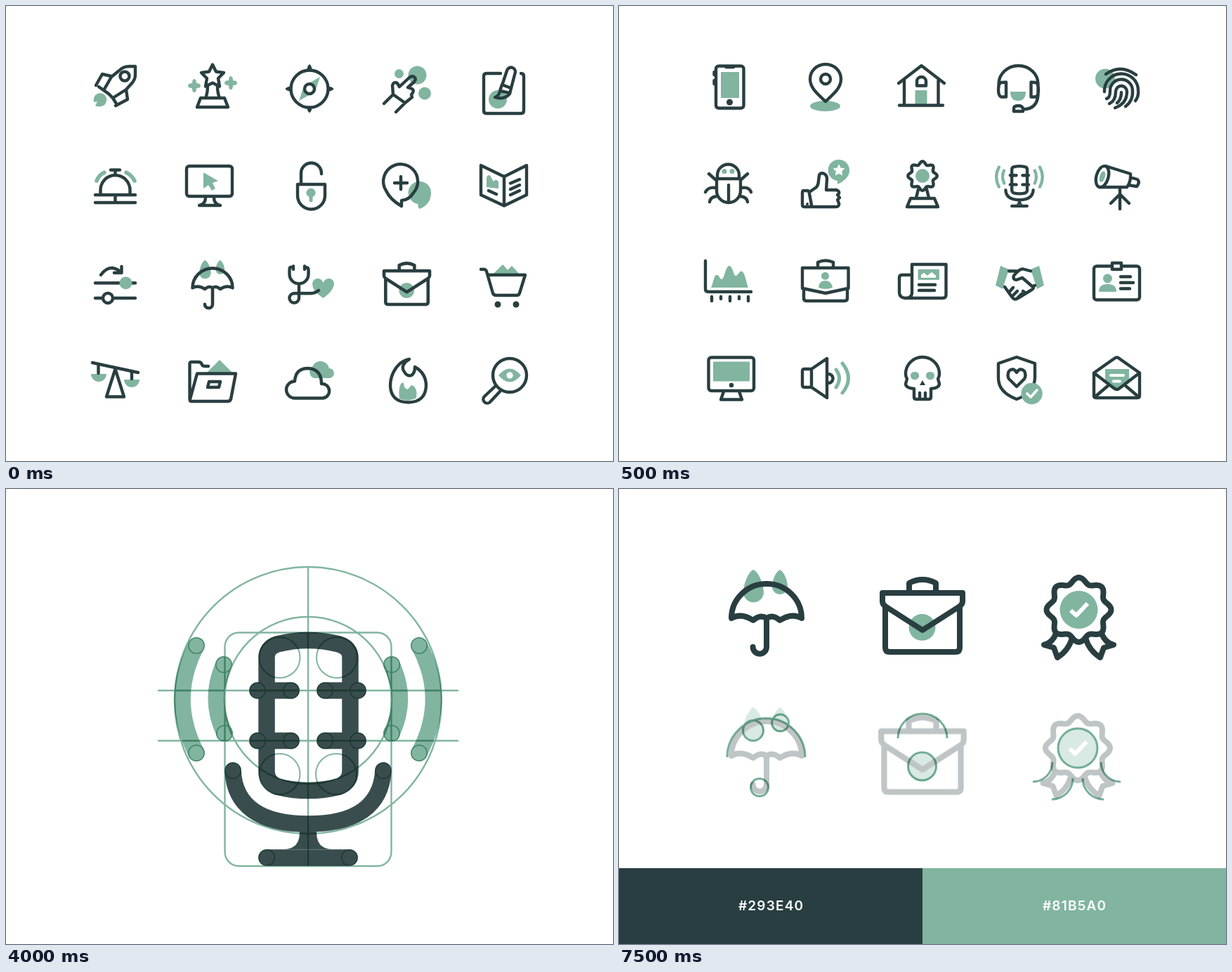
An HTML page that plays this animation: 864 by 648 pixels, repeating every 8 s.

```html
<!DOCTYPE html>
<html lang="en">
<head>
<meta charset="utf-8">
<title>Icon set</title>
<style>
html, body { margin: 0; width: 100%; height: 100%; overflow: hidden; background: #fff; }
svg { display: block; width: 100vw; height: 100vh; background: #fff; fill: none; stroke: #293e40;
  stroke-width: 4.4; stroke-linecap: round; stroke-linejoin: round; }
.g { fill: #81b5a0; stroke: none; }
.k { fill: #293e40; stroke: none; }
.w { fill: #fff; stroke: none; }
.l { stroke: #81b5a0; }
.c { stroke: #fff; }
.large { stroke-width: 8; }
.guide { stroke: #81b5a0; stroke-width: 2.4; mix-blend-mode: multiply; }
.guide.bold { stroke: #74af98; stroke-width: 3; stroke-linecap: butt; }
.faded { opacity: .3; }
text { fill: #fff; stroke: none; font: 600 19px Inter, sans-serif; letter-spacing: 1.2px; text-anchor: middle; }
</style>
</head>
<body>
<svg viewBox="0 0 864 648">
<defs>
  <g id="umbrella" class="large">
    <path class="g" d="M191 115C199 118 206 136 206 147a14.5 14.5 0 0 1-29 0C177 136 184 118 191 115ZM229 115C235 118 240 130 240 139a11 11 0 0 1-22 0C218 130 223 118 229 115Z"/>
    <path d="M160 184a50 49 0 0 1 100 0Q246 176 229 187Q219 178 210 184Q201 178 191 187Q174 176 160 184ZM210 184V225a9.7 9.7 0 0 1-19.4 0"/>
  </g>
  <g id="briefcase" class="large">
    <circle class="g" cx="431.5" cy="197" r="19"/>
    <path d="M413 145V134Q432 124 451 134V145M379 167V226Q379 232 385 232H479Q485 232 485 226V167M375 148H489V160Q489 164 485 167L432 201 379 167Q375 164 375 160Z"/>
  </g>
  <g id="badge" class="large">
    <circle class="g" cx="654.5" cy="172" r="27"/>
    <path class="c" stroke-width="6" stroke-linecap="butt" d="M643 173l8 7 16-17"/>
    <path class="wavy" data-wave="654.5 172 42 4"/>
    <path d="M622 206Q617 219 605 222L619 226 624 240Q640 230 645 212M687 206Q692 219 704 222L690 226 685 240Q669 230 664 212"/>
  </g>
  <g id="waves" class="l" stroke-width="23.5"><path d="M271 223Q231 299 271 376M310 250Q288 299 311 348M588 223Q629 299 588 376M549 250Q572 299 549 348"/></g>
  <g id="mic" stroke-width="23.5">
    <path d="M371 240Q371 226 386 221Q430 210 474 221Q490 226 490 240V402Q490 417 474 424Q430 435 386 424Q371 417 371 402ZM358 287H406M454 287H501M358 358.5H406M454 358.5H501M323 401C325 450 360 477 430 477S534 450 537 401M371 525H489"/>
    <path class="k" d="M418 485V489Q418 513 395 513H465Q442 513 442 489V485Z"/>
  </g>
</defs>

<g class="scene">
  <!-- rocket, trophy, compass, hand, brush -->
  <path class="g" d="M127 127Q134 121 141 127Q146 134 140 141Q134 145 127 142L130 136 125 137Q124 131 127 127Z"/>
  <path d="M184 86H175Q167 86 161 92L150 101 139 120Q146 124 152 131L171 119 180 109Q184 104 184 98ZM150 100L137 97 128 113M139 120L132 115M171 119L173 133 156 142M152 131L157 139"/>
  <circle cx="169" cy="100" r="6.5"/>
  <path class="g" d="M268 104Q271 104 271 110Q277 110 277 113.500Q277 117 271 117Q271 123 268 123Q265 123 265 117Q259 117 259 113.500Q259 110 265 110Q265 104 268 104ZM320 100Q323 100 323 106Q329 106 329 109.500Q329 113 323 113Q323 119 320 119Q317 119 317 113Q311 113 311 109.500Q311 106 317 106Q317 100 320 100Z"/>
  <path d="M294 83.500l5 10 11 1.500-8 8 2 11.500-10-5-10 5 2-11.500-8-8 11-1.500ZM287 114Q287 124 284 131M301 114Q301 124 304 131M277 131H311L316 144H272Z"/>
  <path class="g" d="M447 101L440 122 417 135 424 114Z"/>
  <circle cx="432" cy="118" r="26.500"/><circle class="w" cx="432" cy="118" r="7"/><circle cx="432" cy="118" r="7"/>
  <path class="k" d="M432 83Q435 84 436 93H428Q429 84 432 83ZM432 152Q435 151 436 143H428Q429 151 432 152ZM397.500 118Q399 115 407 114V122Q399 121 397.500 118ZM466.500 118Q465 115 457 114V122Q465 121 466.500 118Z"/>
  <g class="g"><circle cx="585.500" cy="98.500" r="13"/><circle cx="559.500" cy="96.500" r="6.500"/><circle cx="596" cy="124.500" r="9"/></g>
  <path d="M538 139L551 126 568 138 555 151M551 126L550 113Q552 107 557 110L560 115 574 102Q579 98 582 102 584 105 581 108L572 116 578 118Q582 121 577 126L578 130 568 138"/>
  <circle class="g" cx="700" cy="133" r="13"/>
  <path d="M704 96H684Q680 96 680 100V149Q680 153 684 153H733Q737 153 737 149V100Q737 96 733 96M706 113L713 92Q715 87 720 87.500 725 89 725 94L719 117M706 112L719 117 717 125Q709 134 696 130 702 128 703 121ZM704 121L717 124"/>
  <!-- bell, screen, lock, chat, book -->
  <path class="l" stroke-width="5.500" d="M129 249Q132 241 140 237M171 237Q179 241 183 249"/>
  <path d="M127 269H184M127 280H184M155.500 270V279M134.500 268V262a21 21 0 0 1 42 0V268M149 233.500H162M155.500 234V239"/>
  <path class="g" d="M281 237L302 249 294 252 298 260 293 263 288 255 281 260Z"/>
  <rect x="257" y="228" width="65" height="43" rx="4"/>
  <path d="M284 273Q284 282 275 284H305Q296 282 296 273"/>
  <path class="g" d="M431.500 272a6.500 6.500 0 1 1 5 0V278Q434 281 431.500 278Z"/>
  <path d="M415 254H454V270a19.500 19.500 0 0 1-39 0ZM420 252V238a14.500 14.500 0 0 1 29 0V239"/>
  <path class="g" d="M589 289Q585 286 587 282A16.200 16.200 0 1 1 605 266Q605 282 589 289Z"/>
  <path d="M563 285V277Q574 276 580 266A24.500 24.500 0 1 0 541 263Q547 276 563 285ZM553 252H571M562 243V261"/>
  <path class="g" d="M684 258V244Q687 238 690 243L694 250Q697 245 701 250V260Z"/>
  <path d="M709 243L676 227V269L709 284.500 741 269V227ZM709 243V284M687 263L698 268M718 252.500L731 247M718 261L731 255M718 269L731 263"/>
  <!-- sliders, umbrella, stethoscope, briefcase, cart -->
  <path d="M135 383Q142 373 151 373 159 374 164 380M164.500 371V380H154M127 394.500H184M127 416H137M153 416H184"/>
  <circle cx="145" cy="416" r="7"/><circle class="g" cx="170.500" cy="394.500" r="9"/>
  <use href="#umbrella" transform="translate(174.300 296.500) scale(.57)"/>
  <path class="g" d="M451.500 416Q436 406 436 396 437 388 444 388 449 388 451.500 394 454 388 460 388 467 389 467 396 466 406 451.500 416Z"/>
  <path d="M408 372H405Q403.500 372 403.500 376V382a13.500 13.500 0 0 0 27 0V376Q430.500 372 426 372M409 370.500V375M425 370.500V375M417 396V416a6.800 6.800 0 1 1-6.800-6.800H434Q440 409 445 405"/>
  <use href="#briefcase" transform="translate(324.300 292.800) scale(.57)"/>
  <path class="g" d="M693 382L707 368 714 376 720 370 731 382Z"/>
  <path d="M676 375H680Q683 375 684 378L693 409Q694 412 698 412H727Q730 412 731 409L739 383H686"/>
  <g class="k"><circle cx="700" cy="425" r="4.500"/><circle cx="726" cy="425" r="4.500"/></g>
  <!-- scales, folder, cloud, flame, magnifier -->
  <path class="g" d="M121 524H143a11 11 0 0 1-22 0ZM168 532H190a11 11 0 0 1-22 0Z"/>
  <path d="M123 508L188 522M155.500 517L143 556.500H168ZM131.500 511V523M179 521V531"/>
  <path class="g" d="M285 523L304 504 323 523Z"/>
  <path d="M261.500 560V509Q262 507 264 507H274Q278 507 279 511 280 513 284 513H288M272 523.500H327L320 560Q319 563 315 563H264Q261 563 262 560ZM289 535H305L303 543H287Z"/>
  <path class="g" d="M439 530a9 9 0 0 1-3-16 12.500 12.500 0 0 1 24 2 7 7 0 0 1 0 14Z"/>
  <path d="M411 558.500a12 12 0 0 1 0-24Q412 516 430 516 449 517 449 538a10.300 10.300 0 0 1 2 20.500Z"/>
  <path class="g" d="M560 559Q558 541 564 536 567 537 567 543L571 546Q576 543 576 540L580 541Q586 546 584 558Q572 565 560 559Z"/>
  <path d="M574 503C564 509 563 516 567 521Q571 528 577 526 582 523 582 514 598 523 598 541 597 564 572.500 564.500 548 564 547 541C547 523 558 506 574 503Z"/>
  <path class="g" d="M701 526Q717 507 733 526Q717 545 701 526Z"/>
  <circle class="w" cx="717" cy="526" r="4.700"/><circle cx="717" cy="526" r="24"/>
  <path d="M697 541L681 556a5.500 5.500 0 0 0 8 8L703 549"/>
</g>

<g class="scene">
  <!-- phone, pin, house, headset, fingerprint -->
  <rect class="g" x="145" y="94" width="26" height="37" rx="1"/>
  <rect x="138" y="85.500" width="39.500" height="60" rx="4"/><circle class="k" cx="157.500" cy="137" r="4.500"/>
  <path d="M152.500 87H163M135.500 94V98M135.500 106V111"/>
  <ellipse class="g" cx="293.500" cy="142.500" rx="21.500" ry="7.500"/>
  <path d="M294 136C281 124 272 116 272 104a22 21 0 0 1 44 0C316 116 307 124 294 136Z"/><circle cx="294" cy="104" r="7"/>
  <rect class="g" x="421.500" y="120" width="17" height="20" rx="1"/>
  <path d="M398 110L430.500 85 463 110M406 106V140M454.500 106V140M399 141.500H461M424 113.500V107a6.500 6 0 0 1 13 0V113.500Z"/>
  <path class="g" d="M557 122H579Q579 135 568 135T557 122Z"/>
  <path d="M540.500 116V111a28 26 0 0 1 56 0V127Q595 146 577 147M551 108.500V129.500H544Q540 128 540 119T544 109ZM586.500 108.500V129.500H593Q597 128 597 119T593 109ZM562 150V146Q562 142 568 142T575 146V150Z"/>
  <circle class="g" cx="692" cy="103.500" r="14"/>
  <path d="M693 97Q714 82 736 98M691 122A23.500 23.500 0 0 1 739 119Q740 129 735 135M694 132Q699 131 699 121A15.800 15.800 0 0 1 731 120Q732 135 721 143M698 139Q707 135 707 122A7.800 8 0 0 1 723 122Q723 139 706 145M715 123Q715 133 709 138"/>
  <!-- bug, thumb, award, microphone, telescope -->
  <g class="g"><circle cx="150" cy="235.500" r="3.500"/><circle cx="161" cy="235.500" r="3.500"/></g>
  <path d="M139 246H173V263a17 17 0 0 1-34 0ZM156 255V279M140 245V241a15.500 15.500 0 0 1 31 0V245M128 239L137 247M183 239L174 247M138 259Q127 257 123 265M139 271Q130 272 129 279M174 259Q185 257 188 265M173 271Q182 272 183 279"/>
  <path class="g" d="M311 254V249A15.200 15.200 0 1 1 328 234Q328 246 311 254Z"/>
  <path class="w" d="M313 225l2.500 5.500 6 .800-4.300 4.200 1 6-5.200-2.800-5.200 2.800 1-6-4.300-4.200 6-.800Z"/>
  <path d="M263 263H268Q270 263 270.500 265L274 283Q274 286 271 286H264Q261 286 261 283V266Q261 263 263 263ZM271 265L281 258Q284 254 284 249L285 241Q286 238 290 238 296 240 296 246L295 262H309Q314 263 313 267L311 269 314 273 311 276 313 281Q314 286 308 286H273"/>
  <circle class="k" cx="268" cy="282" r="2"/>
  <circle class="g" cx="432" cy="242" r="10"/><path class="wavy" data-wave="432 242 18.500 2.200"/>
  <path d="M426 261L423 273M438 261L441 273M415 274H449L454 286H410Z"/>
  <g transform="translate(491.100 188.600) scale(.1835)"><use href="#waves"/><use href="#mic"/></g>
  <g transform="rotate(16 688 243)"><ellipse cx="688" cy="243" rx="8.500" ry="15.500"/><ellipse class="g" cx="688" cy="243" rx="3.800" ry="8"/></g>
  <path d="M693 228L728 239Q729 250 723 258L684 258M728 244L738 247Q742 251 737 257L725 255M713 261V289M713 268L700 281M713 268L726 281"/>
  <!-- chart, briefcase, newspaper, handshake, identity card -->
  <path class="g" d="M131 401C135 392 135 383 139 383S144 391 147 389 152 370 157 370 163 386 167 384 171 377 175 378 181 393 184 401Z"/>
  <path d="M123 363V403Q123 407 127 407H188M132 414V420M145 414V417M158 414V420M171 414V417M184 414V420"/>
  <path class="g" d="M293.500 379a5.500 5.500 0 1 1-.1 0ZM284 401Q285 391 293.500 391T304 401Q294 405 284 401Z"/>
  <path d="M261 373H326.500V402L294 409 261 402ZM263 404V416Q263 420 267 420H321Q325 420 325 416V404M283 371V365Q294 360 305 365V371"/>
  <rect class="g" x="425.500" y="375" width="30.500" height="15" rx="1"/>
  <path class="w" d="M430 387V383L434 380 439 384 445 379 451 384V387Z"/>
  <path d="M417 368H465.500V412Q465 416 461 416H407Q399 415 399 408V387Q399 383 403 383H416M417 368V408Q417 416 408 416M427 397H450M427 405H449"/>
  <path class="g" d="M543 370L555 375 546 403 536 398ZM598 370L586 375 595 403 605 398Z"/>
  <path d="M555 377.500H566M586 377.500L575 374.500Q570 374 562 384 560 390 566 390L574 387 589 400M549 400L559 414Q563 420 568 416L586 405Q592 402 589 399L592 398M555 408L561 401M560 413L567 406M566 417L573 410M575 406L579 409"/>
  <rect x="676" y="370.500" width="65" height="48" rx="4"/>
  <path fill="#fff" d="M702 366H715V375H702Z"/>
  <path class="g" d="M695.500 381.500a6.500 6.500 0 1 1-.1 0ZM683 407Q683 396 695.500 396T708 407Z"/>
  <path d="M714 385.500H728M714 394H732M714 402.500H727"/>
  <!-- computer, speaker, skull, shield, letter -->
  <rect class="g" x="134" y="506.500" width="52" height="28" rx="1"/>
  <rect x="127.500" y="500.500" width="64.500" height="47.500" rx="4"/><circle class="k" cx="160" cy="540" r="3.200"/>
  <path d="M149 549L145 560.500H175L171 549"/>
  <path class="l" stroke-width="5" d="M309 518Q318 530 309 543M318 509Q335 530 318 551"/>
  <path d="M274 517H264Q261 517 261 520V540Q261 543 264 543H274ZM274 517L296 502V558L274 543M298 524a6.500 6.500 0 0 1 0 13"/>
  <path class="g" d="M415 526Q415 521 422 521 428 522 427 528 425 533 419 532 415 531 415 526ZM449 526Q449 521 442 521 436 522 437 528 439 533 445 532 449 531 449 526Z"/>
  <path d="M420 557V545Q408 544 408 538L410 531Q408 528 408 524a24 24 0 0 1 48 0Q456 528 454 531L456 538Q456 544 444 545V557Q444 560 441 560H423Q420 560 420 557ZM428 551V559M436 551V559"/>
  <path class="k" d="M432 533L436 540H428Z"/>
  <path d="M566 500L592 509V530Q591 551 566 560Q540 550 540 530V509ZM566 542L555 531Q552 526 555 520 561 514 566 522 571 514 577 520 580 526 577 531Z"/>
  <circle class="g" cx="587.500" cy="552" r="15.200"/><path class="c" stroke-width="3.600" d="M581 552L586 557 595 547"/>
  <path class="g" d="M692 517H726V536L709 547 692 536Z"/>
  <path class="c" stroke-width="4" d="M700 526H718M704 534.500H713"/>
  <path d="M676 522.500L705 502Q709 499 712 502L741 522.500V555Q741 558 738 558H679Q676 558 676 555ZM676 522.500L704 544Q709 548 713 544L741 522.500M677 557L697 540M740 557L720 540"/>
</g>

<g class="scene">
  <use href="#waves"/><use href="#mic" opacity=".92"/>
  <g class="guide">
    <circle cx="430" cy="301" r="190"/><circle cx="430" cy="301" r="119"/>
    <rect x="311.500" y="204.500" width="237" height="332.500" rx="20"/>
    <path d="M430 111V537M217 287H643M217 358.500H643"/>
    <g class="dots" stroke-width="2" data-r="29" data-at="389.5,240 471,240 389.5,406 470,406"></g>
    <g class="dots" stroke-width="1.500" data-r="11.3" data-at="271,223 271,376 310,250 311,348 588,223 588,376 549,250 549,348 358,287 406,287 454,287 501,287 358,358.5 406,358.5 454,358.5 501,358.5 323,401 537,401 371,525 489,525"></g>
  </g>
</g>

<g class="scene">
  <use href="#umbrella"/><use href="#briefcase"/><use href="#badge"/>
  <g class="faded"><use href="#umbrella" y="196"/><use href="#briefcase" transform="translate(-13 192.600) scale(1.030)"/><use href="#badge" x="-1.500" y="197"/></g>
  <g class="guide bold">
    <path d="M154 382a55.500 55.500 0 0 1 111 0M397 355a35 35 0 0 1 70 0M589 417a28 28 0 0 0 28-28M714 417a28 28 0 0 1-28-28M616 442a30 30 0 0 0 30-30M690 442a30 30 0 0 1-30-30"/>
    <circle cx="191" cy="344" r="14.500"/><circle cx="229.500" cy="333" r="12"/><circle cx="200" cy="425" r="12.500"/>
    <circle cx="431.500" cy="395" r="20"/><circle cx="653" cy="369" r="28"/>
  </g>
  <path class="k" d="M0 540H432V648H0Z"/><path class="g" d="M432 540H864V648H432Z"/>
  <text x="216.600" y="600">#293E40</text><text x="648.600" y="600">#81B5A0</text>
</g>
</svg>
<script>
// Closed outline with eight soft lobes.
for (const path of document.querySelectorAll('.wavy')) {
  const [cx, cy, radius, swing] = path.dataset.wave.split(' ').map(Number);
  const points = Array.from({ length: 160 }, (_, i) => {
    const angle = i * Math.PI / 80;
    const r = radius + swing * Math.cos(8 * angle);
    return `${(cx + r * Math.sin(angle)).toFixed(2)} ${(cy - r * Math.cos(angle)).toFixed(2)}`;
  });
  path.setAttribute('d', `M${points.join('L')}Z`);
}

for (const group of document.querySelectorAll('.dots')) {
  group.innerHTML = group.dataset.at.split(' ').map(point => {
    const [x, y] = point.split(',');
    return `<circle cx="${x}" cy="${y}" r="${group.dataset.r}"/>`;
  }).join('');
}

const scenes = [...document.querySelectorAll('.scene')];
const ends = [500, 4000, 7500, 8000];
const start = performance.now();

function draw() {
  const time = (performance.now() - start) % 8000;
  const current = ends.findIndex(end => time < end);
  scenes.forEach((scene, i) => { scene.style.display = i === current ? '' : 'none'; });
  requestAnimationFrame(draw);
}
draw();
</script>
</body>
</html>
```
